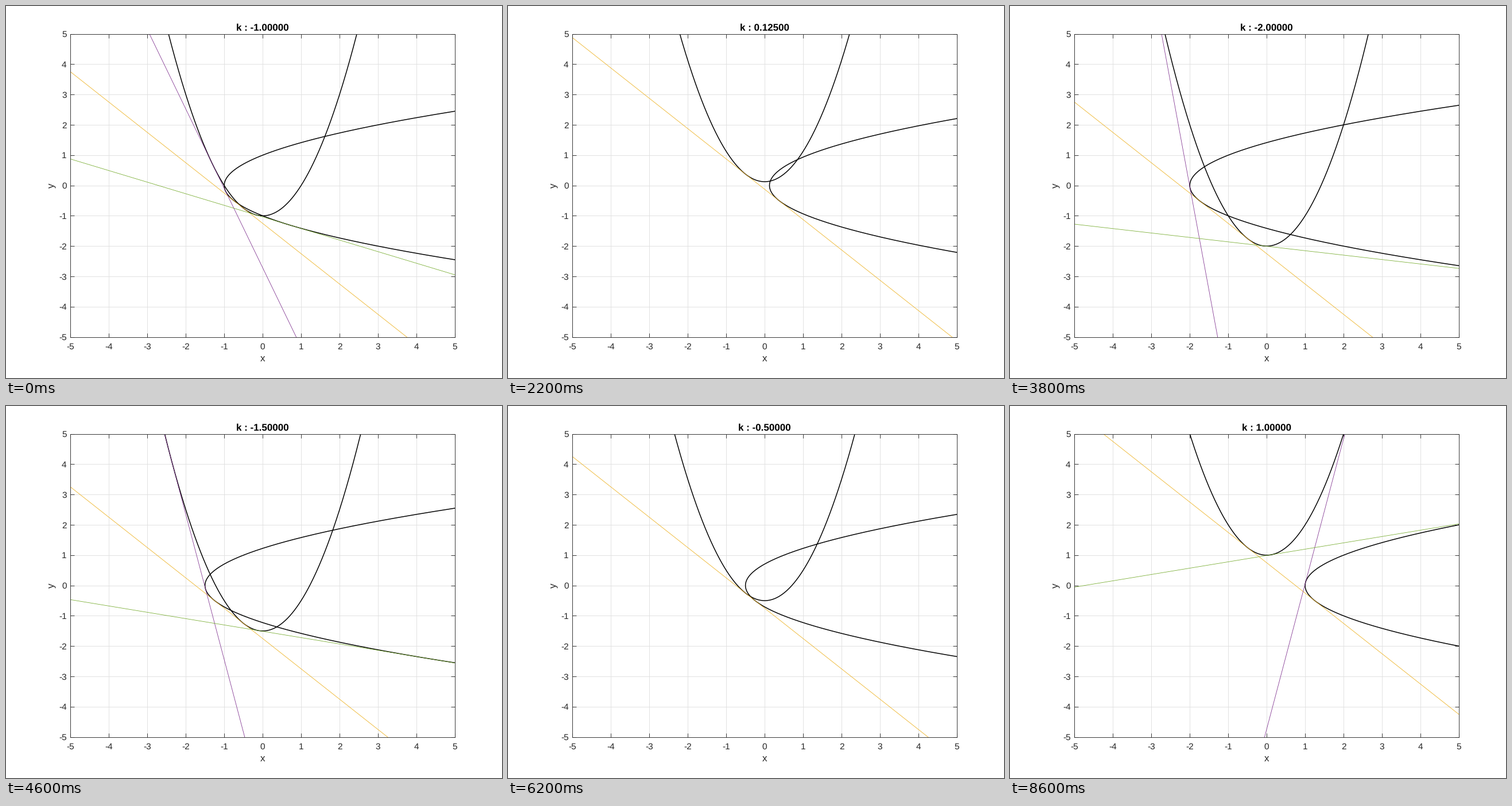
Animation of 864 by 648 pixels, one loop 8.8 s. Source, as a matplotlib script:

```python
import math

import numpy as np
import matplotlib.pyplot as plt
from matplotlib.animation import FuncAnimation

W, H = 864, 648
LEFT, TOP, RIGHT, BOTTOM = 112.3, 48.6, 781.9, 576.7
STEP = 0.125
FRAMES, INTERVAL = 44, 200
GRAY = "#262626"
TANGENT_COLORS = ["#EDB120", "#7E2F8E", "#77AC30"]

plt.rcParams.update({
    "font.family": "Liberation Sans",
    "font.size": 15.4,
    "text.hinting": "none",
    "toolbar": "None",
})

# At 72 dpi one point is one pixel.
fig = plt.figure(figsize=(W / 72, H / 72), dpi=72, facecolor="white")
ax = fig.add_axes([LEFT / W, 1 - BOTTOM / H,
                   (RIGHT - LEFT) / W, (BOTTOM - TOP) / H])


def label(x, y, s, **style):
    style = {"ha": "center", "va": "baseline", "color": GRAY, **style}
    return fig.text(x / W, 1 - y / H, s, **style)


def style_axes():
    ax.set(xlim=(-5, 5), ylim=(-5, 5))
    ticks = range(-5, 6)
    ax.set_xticks(ticks, [])
    ax.set_yticks(ticks, [])
    ax.tick_params(direction="in", length=6.7, width=0.9, color=GRAY,
                   top=True, right=True)
    ax.grid(color="#dfdfdf", linewidth=0.9)
    ax.set_axisbelow(True)
    for spine in ax.spines.values():
        spine.set(color=GRAY, linewidth=0.9)
    for t in ticks:
        part = (t + 5) / 10
        label(LEFT + part * (RIGHT - LEFT), 597.8, str(t))
        label(105.6, BOTTOM - part * (BOTTOM - TOP) + 5.6, str(t), ha="right")
    mid_x, mid_y = (LEFT + RIGHT) / 2, (TOP + BOTTOM) / 2
    label(mid_x, 618.6, "x", size=17)
    label(80, mid_y, "y", size=17, rotation=90, va="center")
    return label(mid_x, 43, "", size=17, weight="bold", color="black")


title = style_axes()
parabolas = [ax.plot([], [], color="black", lw=1.5)[0] for _ in range(2)]
tangents = [ax.plot([], [], color=c, lw=0.8)[0] for c in TANGENT_COLORS]
u = np.linspace(-3, 3, 401)
ends = np.array([-6.0, 6.0])


def parameter(i):
    """Sweep from -1 to 1 with a slow start, then from -2 to 1."""
    if i < 19:
        return -1 + STEP * (i // 2 if i < 4 else i - 2)
    return -2 + STEP * (i - 19)


def slopes(k):
    """Roots of (m + 1)(m^2 - (4k + 1)m + 1), steepest of the pair first."""
    b = 4 * k + 1
    disc = b * b - 4
    if disc < 0:
        return [-1]
    steep = (b + math.copysign(math.sqrt(disc), b)) / 2
    return [-1, steep, 1 / steep]


def draw(i):
    k = parameter(i)
    title.set_text(f"k : {k:.5f}")
    parabolas[0].set_data(u, u**2 + k)
    parabolas[1].set_data(u**2 + k, u)
    for line in tangents:
        line.set_data([], [])
    for line, m in zip(tangents, slopes(k)):
        line.set_data(ends, m * ends + k - m * m / 4)
    return [title, *parabolas, *tangents]


anim = FuncAnimation(fig, draw, frames=FRAMES, interval=INTERVAL,
                     repeat=True, repeat_delay=0, blit=False)
plt.show()
```
